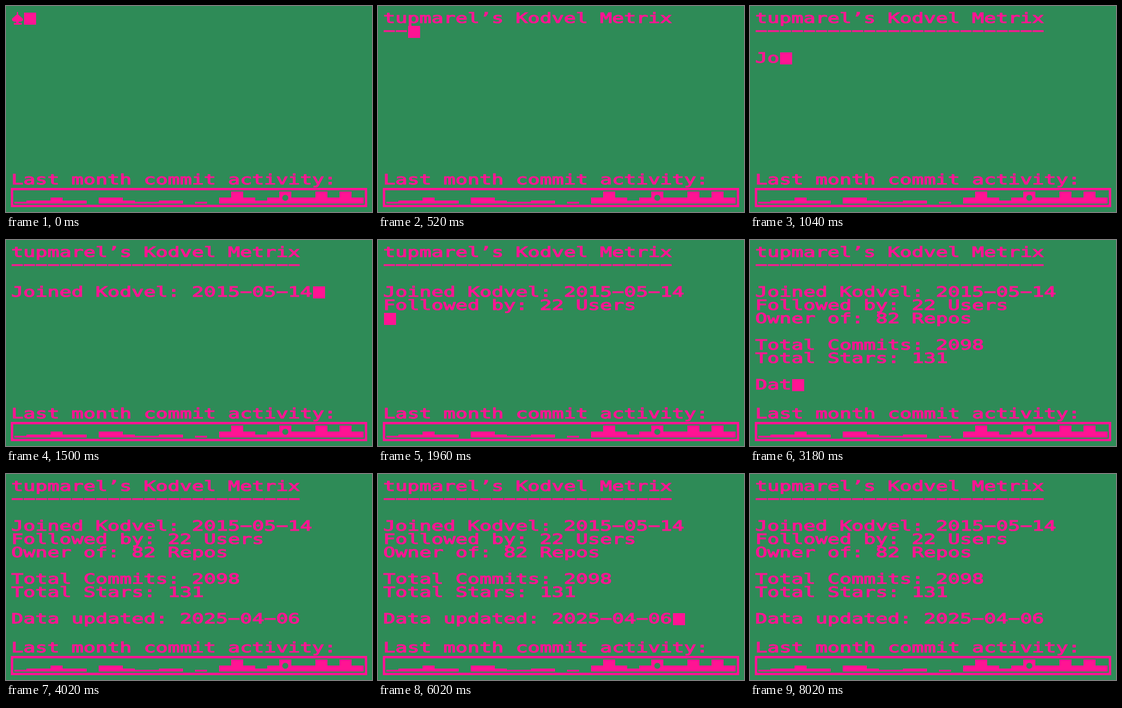
These frames come from a looping animation (608 by 342 pixels, 8420 ms). An HTML page:

```html
<!DOCTYPE html>
<html lang="en">
<head>
<meta charset="utf-8">
<title>Commit metrics</title>
<style>
  html, body { margin: 0; height: 100%; overflow: hidden; background: #2e8b57; }
  svg { display: block; width: 608px; height: 342px; fill: #ff1493; }
  text {
    font: 23.254px "DejaVu Sans Mono", monospace;
    text-rendering: geometricPrecision;
    white-space: pre;
    stroke: #ff1493;
    stroke-width: 1;
  }
</style>
</head>
<body>
<svg viewBox="0 0 608 342">
  <!-- wide terminal lettering: one 20 x 22 cell per character -->
  <g id="rows" transform="translate(8.7 -.5) scale(1.42857 1)">
    <text y="296">Last month commit activity:</text>
  </g>
  <path id="glitch" d="M18 10h2v4l8 7v3l-3 2h-4v2h5v3H13v-3h4v-2h-4l-3-2v-3l8-7z"/>
  <rect id="cursor" width="20" height="20"/>
  <rect x="10" y="304" width="588" height="28" fill="none" stroke="#ff1493" stroke-width="4"/>
  <path id="bars"/>
  <circle cx="464" cy="318.5" r="5" fill="#2e8b57"/>
</svg>
<script>
const LOOP = 8420, STEP = 20, CELL = 20, LINE = 22, BLINK = 400;
const lines = [
  "tupmarel’s Kodvel Metrix",
  "−".repeat(24),
  "",
  "Joined Kodvel: 2015−05−14",
  "Followed by: 22 Users",
  "Owner of: 82 Repos",
  "",
  "Total Commits: 2098",
  "Total Stars: 131",
  "",
  "Data updated: 2025−04−06"
];
const script = lines.join("\n");
const typedAt = (script.length - 1) * STEP;
const activity = [3, 5, 5, 10, 5, 5, 0, 10, 10, 5, 3, 3, 5, 5, 0,
  3, 0, 10, 20, 10, 5, 10, 20, 10, 10, 20, 10, 20, 10];

const $ = id => document.getElementById(id);
const rows = $("rows"), cursor = $("cursor"), glitch = $("glitch");

const texts = lines.map((line, i) => {
  const el = document.createElementNS("http://www.w3.org/2000/svg", "text");
  el.setAttribute("y", 28 + i * LINE - (i === 1 ? 1 : 0));
  return rows.appendChild(el);
});

$("bars").setAttribute("d", activity.map((h, i) =>
  `M${14 + i * CELL} 328v${-h}h${CELL}v${h}z`).join(""));

function draw(t) {
  const count = Math.min(Math.floor(t / STEP) + 1, script.length);
  const shown = script.slice(0, count).split("\n");
  const row = shown.length - 1;
  const garbled = t < STEP;

  texts.forEach((el, i) => {
    const value = garbled ? "" : shown[i] || "";
    if (el.textContent !== value) el.textContent = value;
  });
  glitch.style.display = garbled ? "" : "none";

  cursor.setAttribute("x", 10 + shown[row].length * CELL);
  cursor.setAttribute("y", 11 + row * LINE);
  // the blink starts one step after the last character
  const idle = t - typedAt - STEP;
  const hidden = idle >= 0 && Math.floor(idle / BLINK) % 2 === 1;
  cursor.style.display = hidden ? "none" : "";
}

const start = performance.now();
function tick(now) {
  draw(Math.max(0, now - start) % LOOP);
  requestAnimationFrame(tick);
}
draw(0);
requestAnimationFrame(tick);
</script>
</body>
</html>
```
